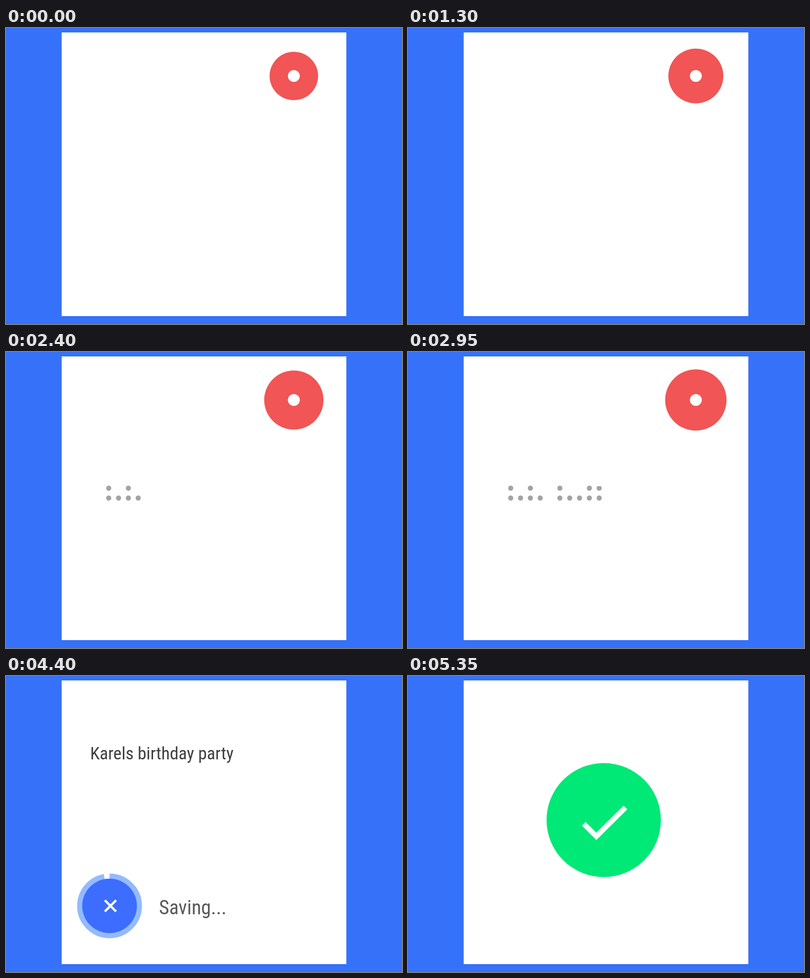
Write an HTML page that moves like this. It is 800 px wide and 600 px high and loops after 6.35 s.

```html
<!DOCTYPE html>
<html lang="en">
<head>
<meta charset="utf-8">
<title>Voice reminder</title>
<style>
  html, body { margin: 0; width: 100%; height: 100%; overflow: hidden; background: #3671f9; }
  svg { display: block; width: 800px; height: 600px; }
  text { font-family: "Roboto Condensed", Roboto, sans-serif; font-stretch: 75%; }
</style>
</head>
<body>
<svg viewBox="0 0 800 600">
  <rect x="112.5" y="9" width="575" height="575" fill="#fff"/>
  <g id="mic">
    <circle id="pulse" cx="581.5" cy="97.3" fill="#f15555"/>
    <circle cx="581.5" cy="97.3" r="12" fill="#fff"/>
  </g>
  <g id="dots" fill="#a3a3a3"></g>
  <text id="title" x="170" font-size="35.5" fill="#3f3f3f">Karels birthday party</text>
  <text id="status" x="309" y="483" font-size="40" fill="#5a5a5a">Saving...</text>
  <g id="button">
    <circle id="ring" r="60" fill="none" stroke="#94baff" stroke-width="11" pathLength="360" transform="rotate(-90)"/>
    <circle id="disc" r="55.3"/>
    <path id="cross" d="M-9.6-11.4 13.2 11.4M13.2-11.4-9.6 11.4" stroke="#fff" stroke-width="4.6"/>
  </g>
  <path id="check" d="M355 299.5 380.5 325 439.3 266.5" fill="none" stroke="#fff" stroke-width="10.6"/>
</svg>
<script>
const LOOP = 6350, STEP = 50;
const $ = id => document.getElementById(id);
const set = (id, attrs) => {
  for (const key in attrs) $(id).setAttribute(key, attrs[key]);
};
const show = (id, on) => set(id, { visibility: on ? "visible" : "hidden" });
const mix = (a, b, p) => a + (b - a) * p;
const mixColor = (a, b, p) => `rgb(${a.map((v, i) => Math.round(mix(v, b[i], p)))})`;
const ramp = (t, start, span) => Math.min(1, Math.max(0, (t - start) / span));
const wave = p => (1 - Math.cos(Math.PI * p)) / 2;
const ease = (t, start, span) => wave(ramp(t, start, span));

const SKY = [41, 121, 255], BLUE = [61, 109, 255], GREEN = [0, 232, 118];

// Each column is revealed from the bottom up; column 4 is a word gap.
const TALL = [0, 2, 5, 8, 9];
const columns = [0, 1, 2, 3, 5, 6, 7, 8, 9].map(i => {
  const x = 207.5 + 19.86 * i;
  const rows = TALL.includes(i) ? [276, 296] : [296];
  const circles = rows.map(y => `<circle cx="${x}" cy="${y}" r="5.2"/>`).join("");
  $("dots").insertAdjacentHTML("beforeend",
    `<clipPath id="clip${i}"><rect x="${x - 6}" width="12" height="40"/></clipPath>` +
    `<g clip-path="url(#clip${i})">${circles}</g>`);
  return { rect: $("clip" + i).firstChild, start: 2020 + 97 * i };
});

function draw(t) {
  const listening = t < 3200, saving = t >= 3500;

  show("mic", listening);
  show("dots", listening);
  const grow = 1 - (1 - ramp(t, 1940, 1010)) ** 3;
  set("pulse", { r: t < 1940 ? mix(49, 57.5, wave(t / 485)) : mix(49, 62, grow) });
  for (const { rect, start } of columns)
    rect.setAttribute("y", mix(301.5, 270.5, ramp(t, start, 60)));

  show("title", !listening);
  set("title", {
    y: mix(291, 168.7, ease(t, 3450, 485)),
    opacity: 1 - ramp(t, 4700, 150)
  });
  show("status", saving);
  set("status", { opacity: 1 - ramp(t, 4700, 150) });

  const move = ease(t, 4700, 650);
  show("button", saving);
  set("button", {
    transform: `translate(${mix(209.2, 395.4, move)} ${mix(466, 292, move)}) scale(${mix(1, 115.5 / 55.3, move)})`
  });
  const sweep = 360 * ease(t, 3535, 970);
  set("ring", {
    "stroke-dasharray": sweep < 360 ? `${sweep} 400` : "none",
    opacity: 1 - ramp(t, 4700, 150)
  });
  set("disc", {
    fill: t < 4700 ? mixColor(SKY, BLUE, ramp(t, 3750, 350)) : mixColor(BLUE, GREEN, move)
  });
  set("cross", { opacity: 1 - ramp(t, 4700, 200) });
  set("check", { opacity: ramp(t, 5100, 250) });
}

const begin = performance.now();
(function frame() {
  const t = (performance.now() - begin) % LOOP;
  draw(Math.floor(t / STEP) * STEP);
  requestAnimationFrame(frame);
})();
</script>
</body>
</html>
```
